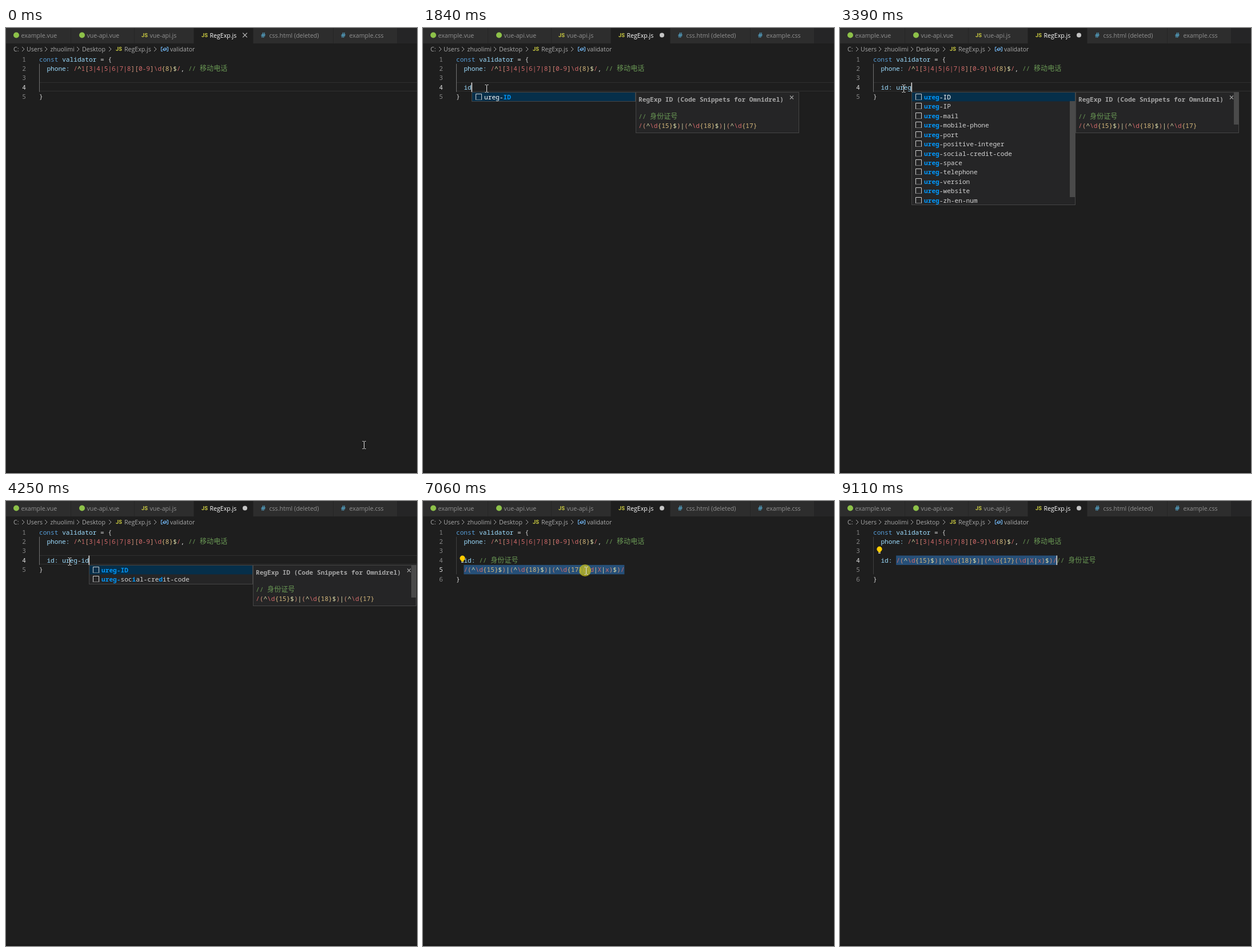
Write an HTML page with a canvas that moves like this. It is 719 px wide and 779 px high and loops after 9.18 s.

```html
<!DOCTYPE html>
<html lang="en">
<head>
<meta charset="utf-8">
<title>Snippet completion</title>
<style>
html, body { margin: 0; width: 100%; height: 100%; overflow: hidden; background: #1e1e1e; }
canvas { display: block; }
</style>
</head>
<body>
<canvas id="stage" width="719" height="779"></canvas>
<script>
const ctx = document.getElementById('stage').getContext('2d');
const LOOP = 9180, W = 719, H = 779;
const LEFT = 58, ADV = 6.69, LINE = 16.43, TOP = 46.2;
const MONO = '"Noto Sans Mono", "DejaVu Sans Mono", monospace';
const CODE = '500 11.15px ' + MONO, BOLD = 'bold 11.15px ' + MONO;
const HAN = '12.1px "Noto Sans CJK SC", "Noto Sans CJK", sans-serif';
const UI = '10.6px "Open Sans", "Noto Sans", sans-serif';
const C = {
  plain: '#d4d4d4', key: '#9cdcfe', word: '#569cd6', note: '#6a9955',
  red: '#d16969', group: '#ce9178', count: '#d7ba7d', sign: '#dcdcaa', match: '#0097fb'
};
const PHONE = '/^1[3|4|5|6|7|8][0-9]\\d{8}$/';
const ID = '/(^\\d{15}$)|(^\\d{18}$)|(^\\d{17}(\\d|X|x)$)/';
const ID_NOTE = [['// ', C.note], ['身份证号', C.note]];
const ACCEPT = 4330, SELECT = 5800, DROP = 8090, AWAY = 8790;

const SNIPPETS = ['ID', 'IP', 'mail', 'mobile-phone', 'port', 'positive-integer',
  'social-credit-code', 'space', 'telephone', 'version', 'website', 'zh-en-num'].map(s => 'ureg-' + s);

const TYPING = [[1760, 'i'], [1840, 'id'], [2070, 'id:'], [2220, 'id: '], [2540, 'id: u'],
  [2690, 'id: ur'], [2850, 'id: ure'], [3000, 'id: ureg'], [3460, 'id: ureg-'],
  [3700, 'id: ureg-i'], [3860, 'id: ureg-id']];

// start, end, steps, x, y
const MOVES = [[70, 600, 8, 113, 105], [750, 830, 2, 111, 106], [5250, 5480, 4, 71, 116],
  [5800, 6350, 8, 365, 116], [6670, 6890, 4, 285, 122], [7140, 7690, 8, 97, 106],
  [8170, 8720, 8, 674, 768]];

const rowTop = n => TOP + LINE * (n - 1);
const colX = n => LEFT + n * ADV;
const ease = p => p * p * (3 - 2 * p);

function box(x, y, w, h, color) {
  ctx.fillStyle = color;
  ctx.fillRect(x, y, w, h);
}

function outline(x, y, w, h, color) {
  ctx.strokeStyle = color;
  ctx.lineWidth = 1;
  ctx.strokeRect(x + .5, y + .5, w - 1, h - 1);
}

function disc(x, y, r, color) {
  ctx.fillStyle = color;
  ctx.beginPath();
  ctx.arc(x, y, r, 0, Math.PI * 2);
  ctx.fill();
}

function poly(color, width, ...lines) {
  ctx.strokeStyle = color;
  ctx.lineWidth = width;
  ctx.beginPath();
  for (const line of lines)
    line.forEach(([x, y], i) => i ? ctx.lineTo(x, y) : ctx.moveTo(x, y));
  ctx.stroke();
}

function label(text, x, y, color, font = UI) {
  ctx.font = font;
  ctx.fillStyle = color;
  ctx.fillText(text, x, y);
}

// Draws [text, colour, font] runs on the character grid.
function runs(parts, x, y) {
  for (const [text, color, font] of parts) {
    const han = text.charCodeAt(0) > 0x3000;
    label(text, x, y, color, han ? HAN : font || CODE);
    x += text.length * (han ? 12.1 : ADV);
  }
}

function regex(source) {
  const parts = [];
  for (const s of source.match(/\\d|\{\d+\}|\[[^\]]*\]|./g)) {
    if (s[0] === '[') parts.push(['[', C.group], [s.slice(1, -1), C.red], [']', C.group]);
    else if (s[0] === '{') parts.push([s, C.count]);
    else if ('()'.includes(s)) parts.push([s, C.group]);
    else if ('^$|'.includes(s)) parts.push([s, C.sign]);
    else parts.push([s, C.red]);
  }
  return parts;
}

function cross(x, y, r, color) {
  poly(color, 1.1, [[x - r, y - r], [x + r, y + r]], [[x + r, y - r], [x - r, y + r]]);
}

function drawTabs(dirty) {
  box(0, 0, W, 27, '#252526');
  const list = [[0, 113, 12, 'example.vue'], [114, 110, 127, 'vue-api.vue'], [225, 103, 237, 'vue-api.js'],
    [329, 103, 342, 'RegExp.js'], [433, 139, 446, 'css.html (deleted)'], [573, 111, 586, 'example.css']];
  for (const [x, w, icon, name] of list) {
    const active = name === 'RegExp.js';
    box(x, 0, w, 27, active ? '#1e1e1e' : '#2d2d2d');
    if (name.endsWith('.vue')) disc(icon + 6, 12.5, 5, '#8dc149');
    else if (name.endsWith('.js')) fileMark(icon, 16);
    else label('#', icon, 16.5, '#519aba', 'bold 12.5px "Open Sans", sans-serif');
    label(name, icon + 14.5, 17, active ? '#ffffff' : '#919191');
  }
  if (dirty) disc(418, 12.5, 4, '#c5c5c5');
  else cross(418, 12.5, 3.8, '#c5c5c5');
}

function fileMark(x, y) {
  label('JS', x, y, '#cbcb41', 'bold 9.2px Roboto, sans-serif');
}

function breadcrumb() {
  const gray = '#a9a9a9';
  [[13, 'C:'], [36, 'Users'], [77.5, 'zhuolimi'], [133, 'Desktop'], [207, 'RegExp.js'], [287, 'validator']]
    .forEach(([x, s]) => label(s, x, 41, gray));
  for (const x of [30, 70, 126, 182, 261])
    poly(gray, 1, [[x - 2, 33], [x + 2, 37], [x - 2, 41]]);
  fileMark(192, 40);
  const blue = '#75beff';
  poly(blue, 1, [[274, 33.5], [271.5, 33.5], [271.5, 40.5], [274, 40.5]],
    [[281, 33.5], [283.5, 33.5], [283.5, 40.5], [281, 40.5]],
    [[274.5, 37], [278, 34.8], [281, 36], [281, 38], [277, 39.7], [274.5, 38.6], [274.5, 37], [277.5, 38], [281, 36]]);
}

function lineNumbers(count, active) {
  for (let n = 1; n <= count; n++)
    label(n, 28.3, rowTop(n) + 12.4, n === active ? '#e0e0e0' : '#858585', CODE);
}

function bulb(x, y) {
  disc(x, y - 1.8, 4.6, '#ffcc00');
  box(x - 2, y + 1.5, 4, 2.5, '#ffcc00');
  box(x - 2, y + 4.6, 4, 1.4, '#c5c5c5');
}

// Returns matched letter positions, or null.
function findHits(name, query) {
  const low = name.toLowerCase(), at = low.indexOf(query);
  if (at >= 0) return [...query].map((_, i) => at + i);
  if (query[0] !== low[0]) return null;
  const hits = [];
  let from = 0;
  for (const ch of query) {
    const i = low.indexOf(ch, from);
    if (i < 0) return null;
    hits.push(i);
    from = i + 1;
  }
  return hits;
}

function suggestions(query, left, scrollable) {
  const y = 112, x = Math.round(left);
  const rows = SNIPPETS.map(name => [name, findHits(name, query)]).filter(r => r[1]);
  const h = Math.round(rows.length * LINE);
  box(x, y, 287, h + 1, '#252526');
  box(x, y, 286, 16.4, '#062f4a');
  rows.forEach(([name, hits], i) => {
    const mid = y + 9 + i * LINE, iy = Math.round(mid) - 5.5;
    poly('#d0d0d0', 1, [[x + 7.5, iy + 10], [x + 7.5, iy], [x + 17.5, iy], [x + 17.5, iy + 10]]);
    for (let k = 0; k < 6; k++) box(x + 7 + k * 2, iy + 9.5, 1, 1, '#d0d0d0');
    runs([...name].map((ch, k) => hits.includes(k) ? [ch, C.match, BOLD] : [ch, i ? C.plain : '#ffffff']),
      x + 22, mid + 4);
  });
  outline(x, y, 287, h + 1, '#454545');
  if (rows.length > 11) box(x + 277, 128, 9, 168, '#4a4a4a');
  details(x + 287, y, scrollable);
}

function details(x, y, scrollable) {
  box(x, y, 286, 72, '#252526');
  ctx.save();
  ctx.beginPath();
  ctx.rect(x, y, 286, 71);
  ctx.clip();
  runs([['RegExp ID (Code Snippets for Omnidrel)', '#a6a6a6', BOLD]], x + 5, y + 16.5);
  runs(ID_NOTE, x + 5, y + 46.5);
  runs(regex(ID.slice(0, 31)), x + 5, y + 63);
  runs(regex(ID.slice(31)), x + 5, y + 79.4);
  ctx.restore();
  cross(x + 273, y + 9.5, 3, '#a0a0a0');
  outline(x, y, 286, 72, '#454545');
  if (scrollable) box(x + 277, y, 9, 57, '#4a4a4a');
}

function pointerAt(t) {
  let x = 626, y = 730;
  for (const [t0, t1, steps, tx, ty] of MOVES) {
    if (t < t0) break;
    const n = Math.floor((t - t0) / (t1 - t0) * (steps - 1) + .01) + 1;
    const p = ease(Math.min(1, n / steps));
    x += (tx - x) * p;
    y += (ty - y) * p;
  }
  return { x, y, down: t >= 5630 && t < 6500 || t >= 7060 && t < DROP };
}

function drawPointer({ x, y, down }) {
  if (down) disc(x - 1.5, y - .5, 10.5, 'rgba(196,190,30,.75)');
  x = Math.round(x) + .5;
  y = Math.round(y);
  const ends = [-1, 1].map(s => [[x - 3, y + 6.5 * s], [x - 1, y + 6.5 * s], [x, y + 5.5 * s],
    [x + 1, y + 6.5 * s], [x + 3, y + 6.5 * s]]);
  poly('#e4e4e4', 1, [[x, y - 6], [x, y + 6]], ...ends);
}

function draw(t) {
  const entry = TYPING.filter(e => e[0] <= t).pop();
  const typed = entry ? entry[1] : '';
  const accepted = t >= ACCEPT, selecting = t >= SELECT, dropped = t >= DROP;
  const line = accepted && !dropped ? 5 : 4;
  const mouse = pointerAt(t);

  box(0, 0, W, H, '#1e1e1e');
  box(0, 776, W, 3, '#1a1a1a');
  drawTabs(t >= 1760);
  breadcrumb();

  if (!selecting) {
    const y = Math.round(rowTop(line));
    box(LEFT, y, W - LEFT, 1, '#303030');
    box(LEFT, y + 15, W - LEFT, 1, '#303030');
  }

  let caretCol = 2 + typed.length, caretFrom = entry ? entry[0] : 750;
  if (accepted) {
    caretCol = 2 + ID.length;
    caretFrom = ACCEPT;
  }
  if (selecting) {
    const reach = t < 6350 ? Math.round((mouse.x - LEFT) / ADV) : 99;
    const from = dropped ? 6 : 2;
    caretCol = Math.max(from, Math.min(from + ID.length, reach));
    caretFrom = dropped ? DROP : t < 6350 ? t : 6350;
    box(colX(from), rowTop(line), colX(caretCol) - colX(from), LINE, '#264f78');
  }

  const last = accepted ? 6 : 5;
  box(LEFT, rowTop(2), 1, rowTop(last) - rowTop(2), selecting ? '#404040' : '#707070');
  lineNumbers(last, line);

  const write = (n, c, parts) => runs(parts, colX(c), rowTop(n) + 12.4);
  write(1, 0, [['const ', C.word], ['validator', C.key], [' = {', C.plain]]);
  write(2, 2, [['phone: ', C.key], ...regex(PHONE), [', ', C.plain], ['// ', C.note], ['移动电话', C.note]]);
  write(last, 0, [['}', C.plain]]);
  if (!accepted) {
    write(4, 2, [...typed].map(ch => [ch, ch === '-' ? C.plain : C.key]));
  } else {
    write(4, 2, [['id: ', C.key], ...(dropped ? regex(ID) : []), ...ID_NOTE]);
    if (!dropped) write(5, 2, regex(ID));
  }

  if (t >= 6500 && !dropped) bulb(69, 102);
  if (t >= 8400) bulb(69, 86);

  if (t >= 750 && Math.floor((t - caretFrom) / 470) % 2 === 0)
    box(Math.round(colX(caretCol)) - .5, rowTop(line), 1.6, LINE, '#d8d8d8');

  if (t >= 1760 && t < 2070) suggestions(typed, colX(caretCol), false);
  else if (t >= 2540 && !accepted) suggestions(typed.slice(4), colX(caretCol), true);

  if (t < AWAY) drawPointer(mouse);
}

function tick() {
  draw(performance.now() % LOOP);
  requestAnimationFrame(tick);
}
tick();
</script>
</body>
</html>
```
